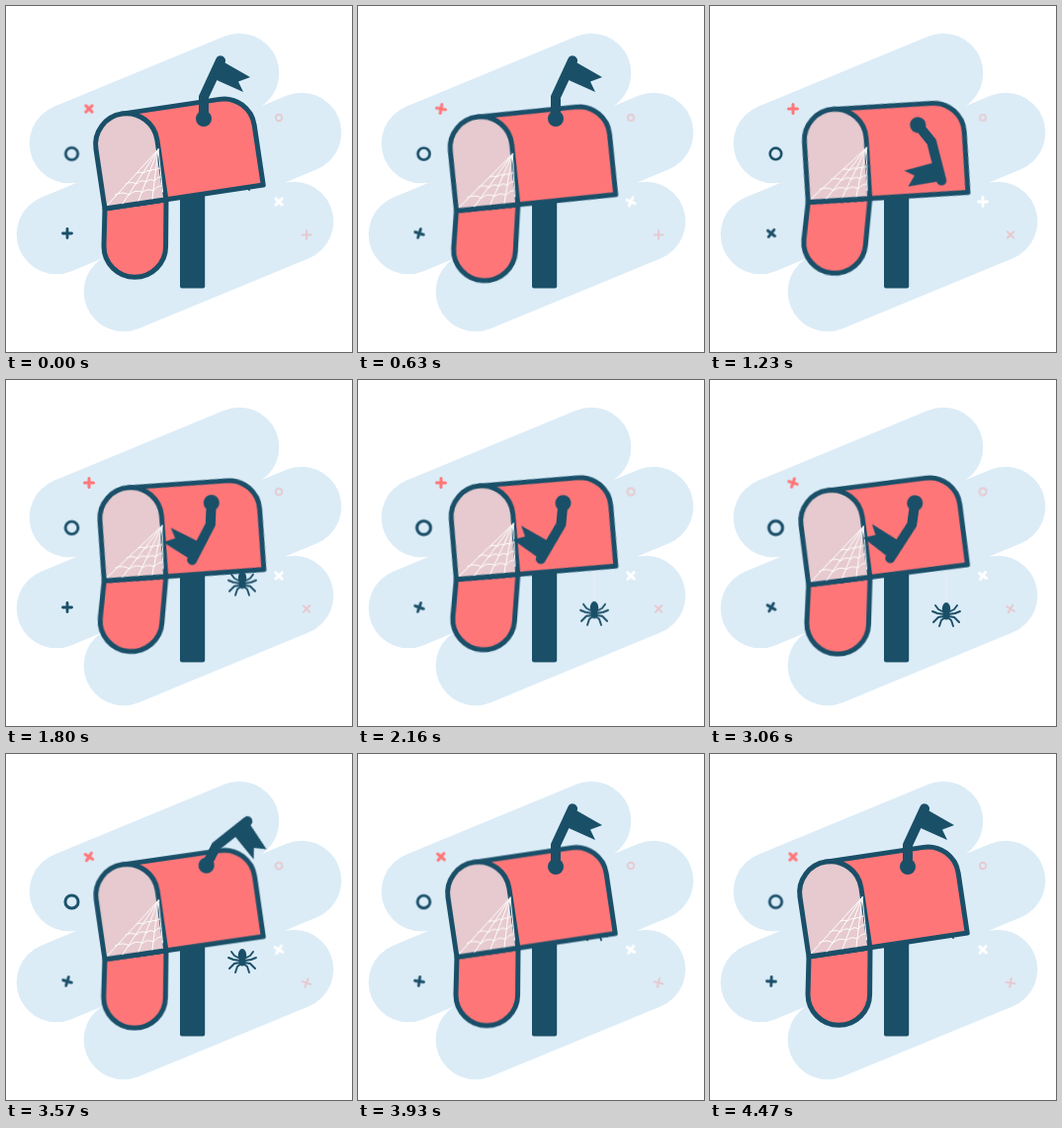
An HTML page without scripts that plays this animation: 350 by 350 pixels, repeating every 4500 ms.

```html
<!DOCTYPE html>
<html lang="en">
<head>
<meta charset="utf-8">
<title>Empty mailbox</title>
<style>
  :root { --navy: #1a4f68; --red: #ff7678; --pink: #e6cacf; --sky: #dbecf7; }
  html, body { margin: 0; width: 100%; height: 100%; overflow: hidden; background: #fff; }
  svg { display: block; width: 100vw; height: 100vh; }

  .line { fill: none; stroke-linecap: round; stroke-linejoin: round; }
  .outline { stroke: var(--navy); stroke-width: 5; stroke-linejoin: round; }
  .navy { stroke: var(--navy); }
  .red { stroke: var(--red); }
  .pink { stroke: var(--pink); }
  .white { stroke: #fff; }

  .bob, .tilt, .flag, .spider, .ring, .cross {
    animation: 4.5s ease-in-out infinite;
  }
  .bob { animation-name: bob; }
  .tilt { animation-name: tilt; transform-origin: 180px 193px; }
  .flag { animation-name: flag; transform-origin: 204px 119px; }
  .spider { animation-name: spider; }
  .ring { animation-name: pulse; }
  .cross.red { animation-name: turn-red; }
  .cross.navy { animation-name: turn-navy; }
  .cross.white { animation-name: turn-white; }
  .cross.pink { animation-name: turn-pink; }

  @keyframes bob {
    0%, 2%, 92%, 100% { transform: none; }
    13% { transform: translateY(6px); }
    27%, 54% { transform: translateY(.5px); }
    40% { transform: translateY(4.4px); }
    72% { transform: translateY(4.4px); }
  }
  @keyframes tilt {
    0%, 2%, 91%, 100% { transform: rotate(0deg); }
    25% { transform: rotate(5deg); }
  }
  @keyframes flag {
    0%, 15% { transform: rotate(0deg); animation-timing-function: ease-in; }
    30% { transform: rotate(194deg); }
    40% { transform: rotate(182.5deg); }
    55%, 71% { transform: rotate(188deg); }
    71% { animation-timing-function: ease-in; }
    82.8% { transform: rotate(-8deg); }
    86%, 100% { transform: rotate(0deg); }
  }
  @keyframes spider {
    0%, 30%, 90%, 100% { transform: translate(239px, 174px); }
    50%, 70% { transform: translate(239px, 237px); }
  }
  @keyframes pulse {
    0%, 2%, 98%, 100% { transform: scale(1); }
    27% { transform: scale(.93); }
    55% { transform: scale(1.15); }
  }
  @keyframes turn-red {
    0%, 2% { transform: rotate(45deg); }
    20%, 42% { transform: rotate(0deg); }
    100% { transform: rotate(45deg); }
  }
  @keyframes turn-navy {
    0%, 2%, 40% { transform: rotate(0deg); }
    27% { transform: rotate(38deg); }
    55% { transform: rotate(35deg); }
    100% { transform: rotate(3deg); }
  }
  @keyframes turn-white {
    0%, 2%, 40% { transform: rotate(45deg); }
    27% { transform: rotate(0deg); }
    55% { transform: rotate(42deg); }
    79% { transform: rotate(32deg); }
    100% { transform: rotate(42deg); }
  }
  @keyframes turn-pink {
    0%, 14% { transform: rotate(0deg); }
    27%, 42% { transform: rotate(45deg); }
    100% { transform: rotate(10deg); }
  }
</style>
</head>
<body>
<svg viewBox="0 0 350 350">
  <defs>
    <path id="plus" d="M-4.5 0H4.5M0-4.5V4.5"/>
    <path id="legs" d="M-2-2L-8-5L-11-9M-2 0L-9-1L-14-3M-2 2L-8 3L-13 8M-1 3L-5 6L-7 12"/>
  </defs>

  <path class="line" stroke="var(--sky)" stroke-width="80.6"
        d="M64 139L236 68M51 231L299 128M119 289L291 218"/>

  <g transform="translate(66.5 149.5)"><circle class="line navy ring" r="6.2" stroke-width="2.8"/></g>
  <g transform="translate(276 113)"><circle class="line pink ring" r="3.2" stroke-width="1.9"/></g>
  <g transform="translate(84 104)"><use href="#plus" class="line red cross" stroke-width="3"/></g>
  <g transform="translate(62 230)"><use href="#plus" class="line navy cross" stroke-width="2.8"/></g>
  <g transform="translate(276 198)"><use href="#plus" class="line white cross" stroke-width="2.8"/></g>
  <g transform="translate(304 231.5)"><use href="#plus" class="line pink cross" stroke-width="2.2"/></g>

  <g class="spider">
    <path class="line" stroke="#f1ebef" d="M0-50V-10"/>
    <g class="line navy" stroke-width="1.9">
      <use href="#legs"/>
      <use href="#legs" transform="scale(-1 1)"/>
    </g>
    <ellipse cy="-5.5" rx="4.2" ry="6.5" fill="var(--navy)"/>
    <circle cy="2" r="3.4" fill="var(--navy)"/>
  </g>

  <rect x="176" y="180" width="25.2" height="105.5" rx="2" fill="var(--navy)"/>

  <g class="bob"><g class="tilt">
    <path class="outline" fill="var(--red)" d="M100 205L99 243A31.3 31.3 0 0 0 161.6 243L162 195.7Z"/>
    <g transform="translate(100 205) rotate(-8.5)">
      <path class="outline" fill="var(--red)" d="M31 0V-92.3H131A31 31 0 0 1 162-61.3V0Z"/>
      <path class="outline" fill="var(--pink)" d="M0 0V-61A31.3 31.3 0 0 1 62.6-61V0Z"/>
    </g>
    <path class="line white" stroke-width="1"
          d="M154 145L103 201M154 145L118 200M154 145L134 197M154 145L148 195M154 145L158.5 188
             M132 169Q136 167 139 169Q143 165 146 167Q149 164 151.5 166Q154 163 155.5 164
             M121 180Q127 177 132 180Q137 175 142 178Q146 174 150 177Q154 172 156.5 173
             M110.5 191Q118 187 124.5 191Q131 185 138 188.5Q143 184 149 187Q154 181 157.5 182"/>
  </g></g>

  <g class="flag" fill="var(--navy)">
    <circle cx="200" cy="114" r="8"/>
    <path class="line navy" stroke-width="10" d="M200 114V92L217 55.3"/>
    <path d="M219 56L247 72L235 76.5L240 87L211 74Z"/>
  </g>
</svg>
</body>
</html>
```
